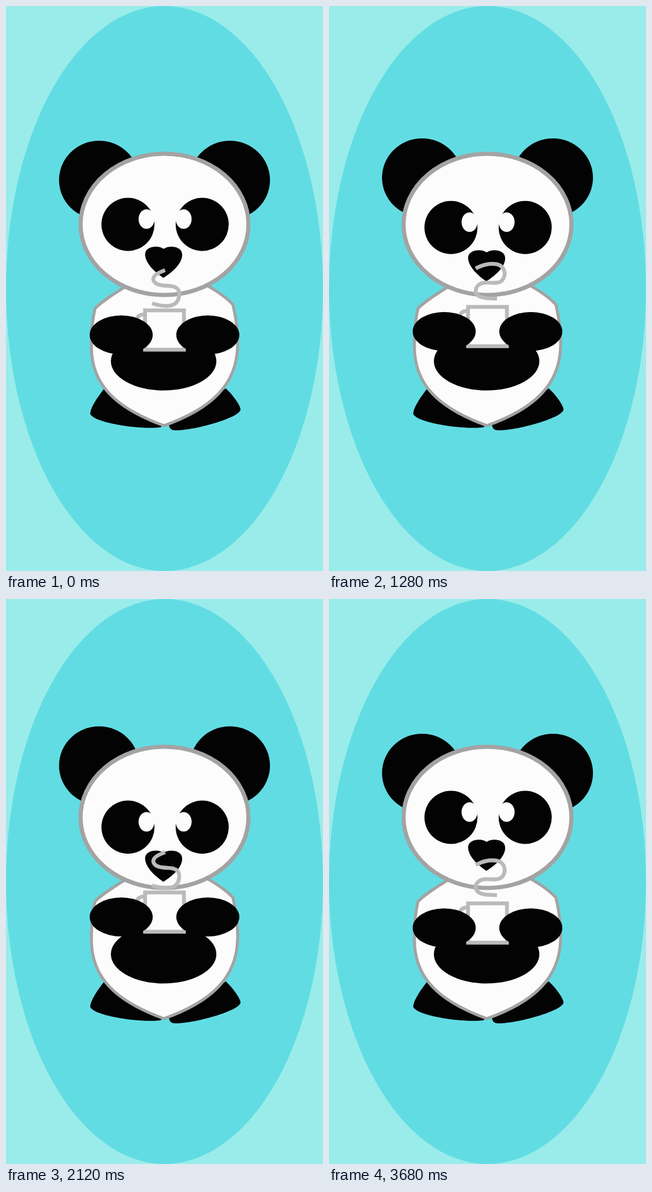
Write an HTML page that moves like this. It is 538x956 px and loops after 4000 ms.

```html
<!DOCTYPE html>
<html lang="en">
<head>
<meta charset="utf-8">
<title>Panda with a hot drink</title>
<style>
  html, body { margin: 0; height: 100%; overflow: hidden; background: #99ecea; }
  svg { display: block; width: 100vw; height: 100vh; }
  .fur { fill: #fcfcfc; }
  .outline { stroke: #a3a3a3; }
  .line { fill: none; stroke: #bababa; stroke-width: 6.5; }
</style>
</head>
<body>
<svg viewBox="0 0 538 956" fill="#030303">
  <ellipse cx="269" cy="478" rx="269" ry="478" fill="#62dce3"/>
  <g id="ears">
    <ellipse cx="158" cy="294.5" rx="68" ry="66.5"/>
    <ellipse cx="380" cy="294.5" rx="68" ry="66.5"/>
  </g>
  <path d="M167 647C155 662 143 680 143 690C148 705 225 717 262 713L270 706Z"/>
  <path d="M373 647C385 658 398 676 398 683C396 697 320 718 288 718C280 718 277 715 276 706Z"/>
  <path class="fur outline" stroke-width="5" d="M151 512C168 494 200 478 222 462L320 462C345 474 370 489 385 505C391 530 394 550 393 577C391 640 350 681 268 710C185 680 145 640 145 577C145 545 147 530 151 512Z"/>
  <ellipse cx="267.5" cy="601" rx="89.5" ry="49.5"/>
  <ellipse class="fur outline" stroke-width="7" cx="269" cy="369.5" rx="142.5" ry="119.5"/>
  <g id="eyes">
    <circle cx="207" cy="369.5" r="45"/>
    <circle cx="333" cy="369.5" r="45"/>
    <ellipse class="fur" cx="238.5" cy="360.5" rx="13.5" ry="16.5"/>
    <ellipse class="fur" cx="301.5" cy="360.5" rx="13.5" ry="16.5"/>
  </g>
  <path id="nose" d="M267.5 411C260 405 236 405 236 421C237 437 255 452 267 460C280 452 299 437 299 421C299 405 275 405 267.5 411Z"/>
  <g id="drink">
    <path class="line outline" d="M236 522C226 521 221 527 221 535"/>
    <rect class="line" style="fill:#fcfcfc" x="236" y="515" width="66" height="66.5"/>
    <path class="line" id="steamA" d="M270 447C256 452 249 457 250 463C252 472 264 473 275 473.5C288 474 294 478 294 487C294 501 286 507 274 507.5C264 508 256 506 248 503"/>
    <path class="line" id="steamB" d="M249 450C262 443 276 441 286 443C299 447 300 460 296 467C292 475 283 475 270 474C256 473 249 480 249 488C250 499 262 501 285 501"/>
    <ellipse cx="195.5" cy="556.5" rx="53.5" ry="33"/>
    <ellipse cx="342.5" cy="556.5" rx="53.5" ry="33"/>
  </g>
</svg>
<script>
const LOOP = 4000, STEP = 40, PUFF = LOOP / 12, SNIFF = 417;
const part = id => document.getElementById(id);
const [ears, eyes, nose, drink, steamA, steamB] =
  ['ears', 'eyes', 'nose', 'drink', 'steamA', 'steamB'].map(part);
const progress = (t, from, to) => Math.min(1, Math.max(0, (t - from) / (to - from)));
const moveY = (el, y) => el.setAttribute('transform', `translate(0 ${y})`);

function draw(now) {
  const t = Math.floor(now % LOOP / STEP) * STEP;
  const sip = progress(t, 1200, 1560) - progress(t, 2000, 2400);
  // two quick twitches of the nose before the sip
  const sniff = t < 2 * SNIFF ? 1 - Math.abs(1 - t % SNIFF / SNIFF * 2) : 0;
  moveY(ears, -18 * sip);
  moveY(eyes, 23.6 * sip);
  moveY(nose, 26.4 * sip - 3.5 * sniff);
  moveY(drink, -26.4 * sip);

  const second = Math.max(0, Math.ceil(t / PUFF - 1e-6) - 1) % 2;
  steamA.style.display = second ? 'none' : '';
  steamB.style.display = second ? '' : 'none';
}

function tick(now) {
  draw(now);
  requestAnimationFrame(tick);
}
draw(0);
requestAnimationFrame(tick);
</script>
</body>
</html>
```
